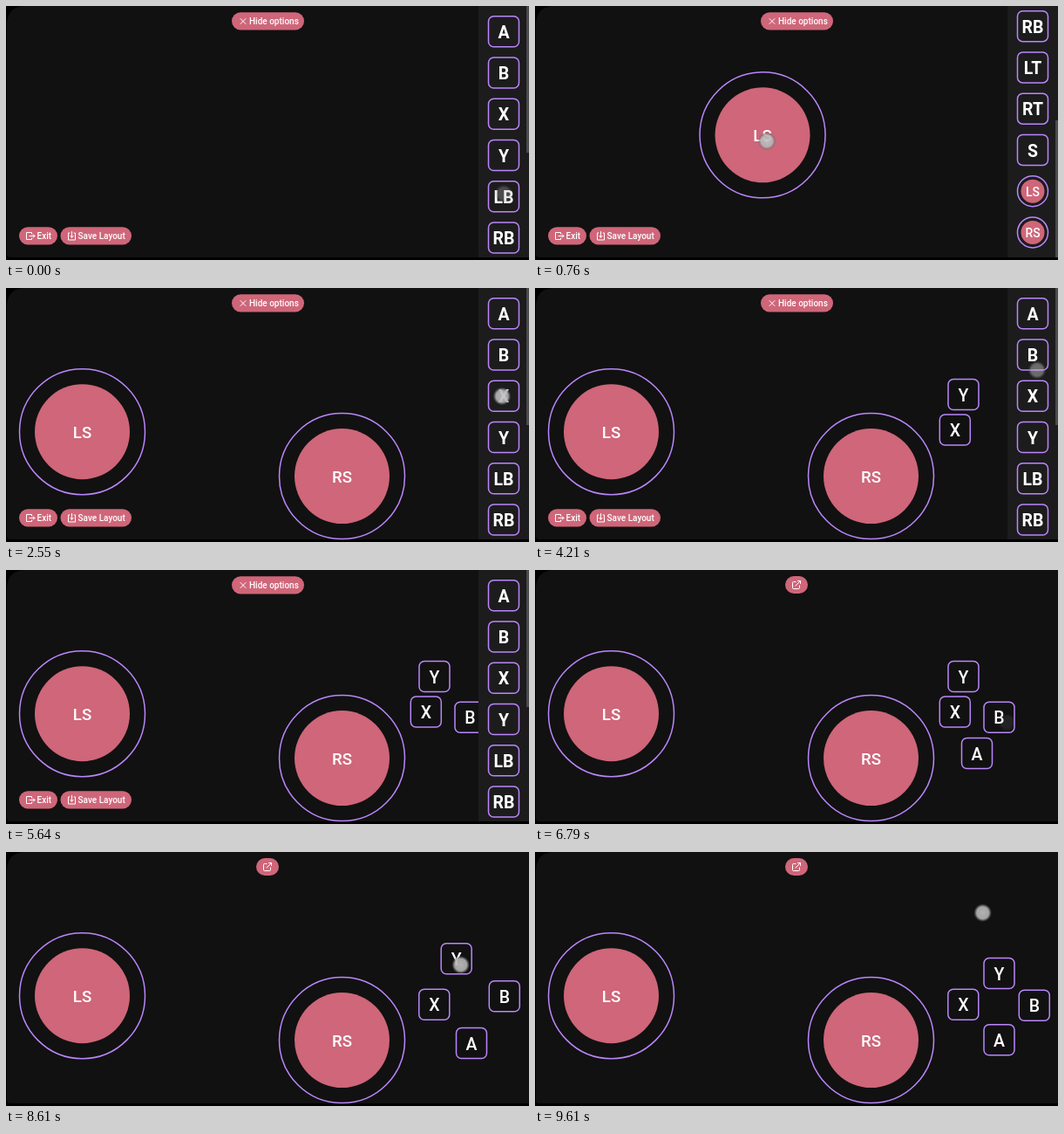
An HTML page for the animation above (9640 ms loop, 600x291 px).

```html
<!DOCTYPE html>
<html lang="en">
<head>
<meta charset="utf-8">
<title>Gamepad layout editor</title>
<style>
html, body { margin: 0; width: 100%; height: 100%; overflow: hidden; background: #000; }
svg { display: block; width: 600px; height: 291px; }
text { font-family: Roboto, "Open Sans", sans-serif; fill: #fff; }
.mid { text-anchor: middle; font-weight: 500; }
.bold { font-weight: 700; }
.line { fill: none; stroke: #bb86fc; stroke-width: 1.5; }
.pink { fill: #cf6679; }
.icon { fill: none; stroke: #fff; stroke-width: 1; stroke-linecap: round; stroke-linejoin: round; }
.label { font-size: 10px; font-weight: 500; }
</style>
</head>
<body>
<svg id="stage" viewBox="0 0 600 291">
  <defs>
    <radialGradient id="dot">
      <stop offset="0" stop-color="#c4c4c6"/>
      <stop offset=".66" stop-color="#b4b4b6"/>
      <stop offset=".78" stop-color="#8a8a8c" stop-opacity=".8"/>
      <stop offset="1" stop-color="#555" stop-opacity="0"/>
    </radialGradient>
    <clipPath id="barClip"><rect x="542" width="58" height="288"/></clipPath>
  </defs>
  <rect width="600" height="291" fill="#000"/>
  <path d="M1 22Q1 0 23 0H600V288H5Q1 288 1 284Z" fill="#111"/>
  <g id="open">
    <rect class="pink" x="287" y="7" width="26" height="20" rx="10"/>
    <path class="icon" d="M299 13.5H296.5Q295.500 13.500 295.500 14.500V20.500Q295.500 21.500 296.500 21.500H302.500Q303.500 21.500 303.500 20.500V18M301.500 12.500H304.500V15.500M304.500 12.500L299 18"/>
  </g>
  <g id="options">
    <rect class="pink" x="259" y="7.300" width="83" height="20.200" rx="10.100"/>
    <path class="icon" d="M269 14.500L275 20.500M275 14.500L269 20.500"/>
    <text class="label" x="279" y="21">Hide options</text>
    <rect class="pink" x="15" y="253.300" width="44" height="20.200" rx="10.100"/>
    <path class="icon" d="M29.500 261V259.500H23.500V267.500H29.500V266M27 263.500H33M31 261.500L33 263.500L31 265.500"/>
    <text class="label" x="35.500" y="267">Exit</text>
    <rect class="pink" x="62.500" y="253.300" width="81.500" height="20.200" rx="10.100"/>
    <path class="icon" d="M73 260H71.500V268H79.500V260H78M75.500 258.500V265M73.500 263.200L75.500 265.200L77.500 263.200"/>
    <text class="label" x="82.500" y="267">Save Layout</text>
  </g>
  <g id="pad"></g>
  <g id="bar" clip-path="url(#barClip)">
    <rect x="542" width="58" height="288" fill="#1c1c1d"/>
    <g id="list"></g>
    <rect id="thumb" x="597" width="3" fill="#4c4c4e"/>
  </g>
  <circle id="finger" r="10.500" fill="url(#dot)"/>
</svg>
<script>
const LOOP = 9640, STEP = 30, FADE = 90, MAX_SCROLL = 242.3;
const HIDE_AT = 6540, HOME = [300.5, 144];
const NAMES = ['A', 'B', 'X', 'Y', 'LB', 'RB', 'LT', 'RT', 'S', 'LS', 'RS'];

// name: time it appears at the centre
const SPAWN = { LS: 540, RS: 1390, X: 2610, Y: 3420, B: 4290, A: 5850 };

// item, start, end, x, y, grab offset x, y
const DRAGS = [
  ['LS', 640, 1040, 87.5, 164.7],
  ['RS', 1530, 1910, 385.5, 215.6],
  ['X', 2730, 3080, 481.8, 162.5],
  ['Y', 3540, 3930, 491.5, 122],
  ['B', 4900, 5160, 425, 183],
  ['B', 5160, 5430, 532.5, 168.7],
  ['A', 5950, 6310, 507, 210],
  ['B', 6860, 7100, 571.8, 165.3, 9, 6],
  ['X', 7260, 7580, 535, 122.5],
  ['A', 7790, 8010, 534, 219, 12, 7],
  ['X', 8110, 8360, 491.3, 174.8],
  ['Y', 8460, 8720, 532.5, 122.5],
  ['B', 8800, 8940, 572.8, 175.8, 15, 6],
  ['A', 9030, 9140, 532.5, 215.2],
  ['Y', 9230, 9390, 532.5, 139, 4.5, 9]
];

// start, end, from x, y, to x, y
const TOUCHES = [
  [60, 360, 571, 215, 571, 45],
  [480, 540, 571, 212, 571, 212],
  [1300, 1380, 571, 258, 571, 258],
  [1990, 2290, 571, 60, 571, 235],
  [2490, 2580, 569, 124, 569, 124],
  [3310, 3390, 571, 171, 571, 171],
  [4240, 4290, 576, 94, 576, 94],
  [5750, 5820, 575, 26, 575, 26],
  [6440, 6520, 300, 18, 300, 18],
  [9390, 9550, 537, 148, 537, 148],
  [9550, 9640, 537, 148, 495, 7]
];

const $ = id => document.getElementById(id);
const clamp = v => Math.max(0, Math.min(1, v));
const mix = (a, b, k) => a + (b - a) * k;
const ease = k => k * k * (3 - 2 * k);
const span = (t, a, b) => clamp((t - a) / (b - a));

function add(parent, tag, attrs, text) {
  const el = document.createElementNS('http://www.w3.org/2000/svg', tag);
  for (const key in attrs) el.setAttribute(key, attrs[key]);
  if (text) el.textContent = text;
  parent.appendChild(el);
  return el;
}

function control(parent, name, inBar) {
  const g = add(parent, 'g', {});
  const stick = name === 'LS' || name === 'RS';
  let size = 19.5;
  if (stick) {
    size = inBar ? 14 : 18.7;
    add(g, 'circle', { class: 'line', r: inBar ? 17.5 : 72 });
    add(g, 'circle', { class: 'pink', r: inBar ? 13.5 : 54.5 });
  } else {
    add(g, 'rect', { class: 'line', x: -17.5, y: -17.5, width: 35, height: 35, rx: 6 });
  }
  const weight = inBar && !stick ? 'mid bold' : 'mid';
  add(g, 'text', { class: weight, y: size * 0.356 + 0.7, 'font-size': size }, name);
  return g;
}

const place = (el, x, y) => el.setAttribute('transform', `translate(${x} ${y})`);
const show = (el, on) => el.setAttribute('visibility', on ? 'visible' : 'hidden');

NAMES.forEach((name, i) => place(control($('list'), name, true), 571, 29.2 + 47.25 * i));
const items = {};
for (const name in SPAWN) items[name] = control($('pad'), name, false);

function position(name, t) {
  let [x, y] = HOME;
  for (const [who, a, b, tx, ty] of DRAGS) {
    if (who !== name || t < a) continue;
    const k = ease(span(t, a, b));
    x = mix(x, tx, k);
    y = mix(y, ty, k);
  }
  return [x, y];
}

function fingerAt(t) {
  let best = { alpha: 0, x: 0, y: 0 };
  const offer = (a, b, at) => {
    const alpha = Math.min(clamp((t - a + FADE) / FADE), clamp((b + FADE - t) / FADE));
    if (alpha > 0 && alpha >= best.alpha) {
      const [x, y] = at(Math.max(a, Math.min(b, t)));
      best = { alpha, x, y };
    }
  };
  for (const [who, a, b, , , dx = 5, dy = 7] of DRAGS) {
    offer(a, b, s => {
      const [x, y] = position(who, s);
      return [x + dx, y + dy];
    });
  }
  for (const [a, b, x0, y0, x1, y1] of TOUCHES) {
    offer(a, b, s => {
      const k = span(s, a, b);
      return [mix(x0, x1, k), mix(y0, y1, k)];
    });
  }
  return best;
}

function draw(t) {
  const open = t < HIDE_AT;
  show($('options'), open);
  show($('bar'), open);
  show($('open'), !open);

  const scroll = MAX_SCROLL * (ease(span(t, 60, 420)) - ease(span(t, 1990, 2350)));
  place($('list'), 0, -scroll);
  $('thumb').setAttribute('y', scroll * 131 / MAX_SCROLL);
  $('thumb').setAttribute('height', t < 900 ? 168 : 157);

  for (const name in items) {
    show(items[name], t >= SPAWN[name]);
    place(items[name], ...position(name, t));
  }

  const f = fingerAt(t);
  place($('finger'), f.x, f.y);
  $('finger').setAttribute('opacity', f.alpha * 0.9);
}

const start = performance.now();
function tick() {
  const t = Math.max(0, performance.now() - start) % LOOP;
  draw(Math.floor(t / STEP) * STEP);
  requestAnimationFrame(tick);
}
tick();
</script>
</body>
</html>
```
